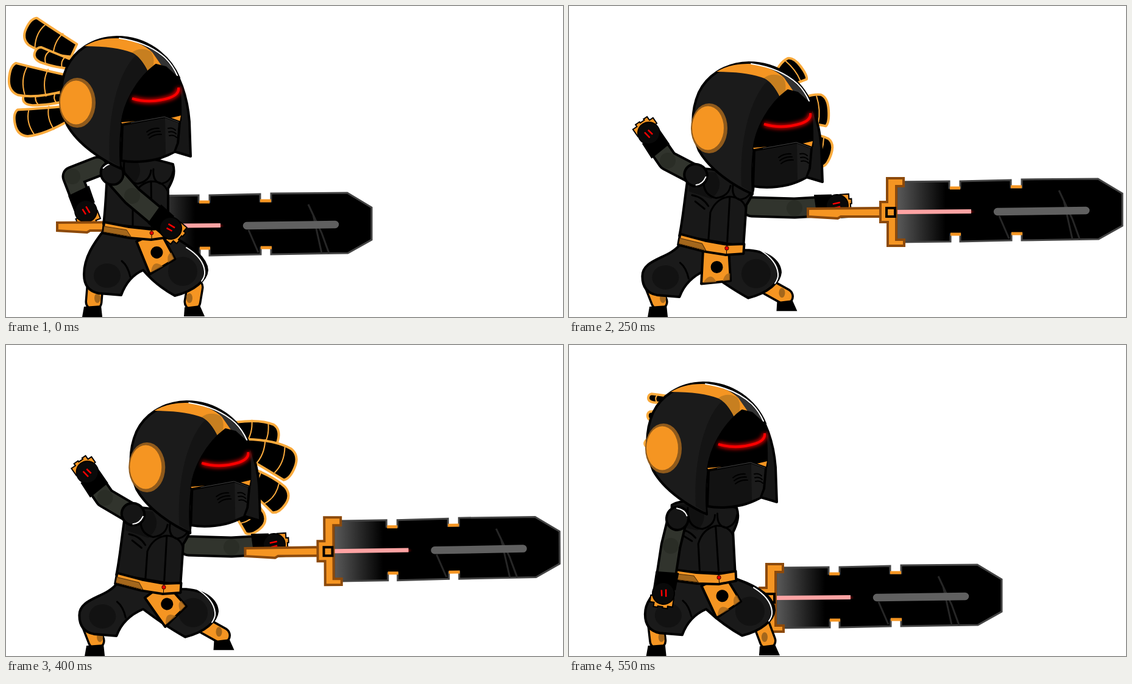
These frames come from a looping animation (914x511 px, 600 ms). An HTML page:

```html
<!DOCTYPE html>
<html lang="en">
<head>
<meta charset="utf-8">
<title>Ninja thrust</title>
<style>
  html, body { margin: 0; width: 100%; height: 100%; overflow: hidden; background: #fff; }
  svg { display: block; width: 100vw; height: 100vh; }
  .ink { stroke: #000; stroke-width: 4; stroke-linejoin: round; }
  .line { fill: none; stroke: #000; stroke-width: 3; stroke-linecap: round; }
  .shine { fill: none; stroke: #fff; stroke-width: 2; stroke-linecap: round; }
  .gold { fill: #f59522; }
  .bronze { fill: #a4671c; }
  .limb { fill: none; stroke-linejoin: round; stroke-linecap: round; }
  .mark { fill: none; stroke: #f00; stroke-width: 2.5; }
</style>
</head>
<body>
<svg viewBox="0 0 914 511" preserveAspectRatio="none">
  <defs>
    <linearGradient id="steel" gradientUnits="userSpaceOnUse" x1="538" y1="0" x2="618" y2="0">
      <stop offset="0" stop-color="#5a5a5a"/><stop offset=".5" stop-color="#2c2c2c"/><stop offset="1"/>
    </linearGradient>
    <filter id="glow" x="-20%" y="-150%" width="140%" height="400%"><feGaussianBlur stdDeviation="3"/></filter>
  </defs>

  <g id="plume"></g>
  <g id="farArm"></g>

  <g id="sword">
    <path fill="url(#steel)" stroke="#444" stroke-width="3" d="M538 289 L624 288 V299 H642 V288 L725 286 V298 H743 V285 L868 284 L908 308 V361 L869 383 L743 385 V374 H726 V385 L642 387 V375 H626 V387 L538 388Z"/>
    <path fill="none" stroke="#262626" stroke-width="3" d="M804 303 L826 350 L838 383 M812 320 L826 383 M706 345 L722 382"/>
    <path stroke="#f59522" stroke-width="5" d="M625 299 h17 M725 297 h18 M626 375 h17 M726 374 h18"/>
    <path d="M703 338 L848 336" stroke="#606060" stroke-width="12.5" stroke-linecap="round"/>
    <g id="beam"></g>
    <g class="gold" stroke="#8c4a0c" stroke-width="4">
      <path d="M392 333 L512 332 V346 H446 L441 349 L392 346Z"/>
      <path d="M522 283 H549 V296 H537 V384 H550 V394 H523 V355 H511 V322 H522Z"/>
      <path stroke="#000" d="M521 332 h14 v14 h-14Z"/>
    </g>
  </g>

  <path id="shins" class="limb" stroke="#000" stroke-width="29"/>
  <path id="calves" class="limb" stroke="#f59522" stroke-width="22"/>
  <g id="footL"><ellipse class="bronze" cx="6" cy="-14" rx="5" ry="8"/><path d="M-19 17 L-16 0 L12 -2 L14 17Z"/></g>
  <g id="footR"><ellipse class="bronze" cx="-5" cy="-14" rx="5" ry="8"/><path d="M-14 16 L-13 1 L12 -2 L20 16Z"/></g>

  <path id="pants" class="ink" fill="#1a1a1a"/>
  <g id="shadeL"><ellipse cx="38" cy="2" rx="22" ry="20" fill="#121212"/><path class="line" d="M62 -22 Q72 -14 76 4"/></g>
  <g id="shadeR"><ellipse cx="-40" cy="2" rx="24" ry="24" fill="#121212"/><path class="shine" d="M-34 -37 Q-6 -20 -4 2 Q-3 10 -9 18"/></g>

  <g id="cloth">
    <path class="ink gold" d="M-21 -4 H21 L25 48 L-23 54Z"/>
    <path class="bronze" d="M-20 52 Q-8 32 2 51Z M12 49 Q16 34 24 36 V47Z" opacity=".75"/>
    <circle cx="2" cy="26" r="10"/>
  </g>

  <g id="torso">
    <path class="ink" fill="#181818" d="M178 262 C200 250 250 262 284 272 C288 286 284 298 276 312 V380 L170 370 C174 340 174 310 178 262Z"/>
    <path fill="#101010" d="M180 262 H222 Q240 285 218 306 L180 296Z"/>
    <path class="line" d="M218 372 V328 Q226 304 248 300 Q270 300 276 318 M248 300 L249 374 M204 268 Q200 300 226 304 Q246 300 248 282 M252 280 Q250 300 264 304 Q280 302 284 284"/>
    <path class="line" stroke-width="5" d="M186 302 Q204 304 214 318 M192 312 L208 323"/>
    <path class="ink gold" d="M171 367 L212 375 L249 379 L277 376 V392 L248 396 L212 393 L169 385Z"/>
    <path class="bronze" stroke="#4d2d08" d="M171 374 L208 380 L215 391 L170 383Z"/>
    <path stroke="#000" d="M249 379 V395"/>
    <circle cx="249" cy="385" r="3" fill="#e00" stroke="#400"/>
  </g>

  <g id="nearArm"></g>

  <g id="head">
    <path class="ink" fill="#161616" d="M262 85 C285 110 298 150 301 190 L303 247 L276 239 L284 130Z"/>
    <path class="ink" fill="#1b1b1b" d="M188 267 C160 255 118 228 100 195 C87 165 87 130 100 100 C112 75 140 52 182 51 C230 51 268 80 284 118 L246 97 C222 112 195 150 190 185 Q184 225 188 267Z"/>
    <path fill="#141414" d="M212 82 C184 110 166 180 170 254 L187 264 Q184 225 190 185 C195 150 222 112 246 97Z"/>
    <path fill="#333" d="M232 66 Q266 86 282 116 L258 103Z"/>
    <path class="gold" d="M129 66 Q152 52 184 53 Q222 58 240 76 L258 102 L246 98 L234 109 Q222 84 208 77 Q180 66 129 66Z"/>
    <path fill="#c77f20" d="M207 76 Q222 66 238 75 Q246 88 240 104 L234 109 Q222 84 207 76Z"/>
    <path class="shine" d="M186 53 Q234 60 262 86 Q274 98 281 114"/>
    <path class="ink" d="M246 97 L262 101 L281 118 Q287 140 286 188 L190 194 C194 160 215 120 246 97Z"/>
    <path class="gold" d="M189 191 L226 188 L194 198Z M270 184 L287 180 L285 190Z"/>
    <g id="visor"></g>
    <path class="ink" fill="#121212" d="M191 195 L260 182 L285 191 L282 225 L276 240 Q262 248 246 252 Q215 259 189 254Z"/>
    <path fill="#1c1c1c" d="M261 184 L283 192 L280 225 L275 239 L262 244Z"/>
    <path d="M205 192 L260 182 L284 191" fill="none" stroke="#444"/>
    <path id="vents" class="line" style="stroke-width:2"/>
    <ellipse cx="117" cy="159" rx="30" ry="41" fill="#8f5a1c"/>
    <ellipse cx="115" cy="158.5" rx="26" ry="36" class="gold"/>
  </g>
</svg>

<script>
const $ = id => document.getElementById(id);
const LOOP = 600, STEP = 50, FIRST = 150;
const times = [0, 150, 250, 350, 450, 500, 550];

const headKeys = [[0, 0], [54, 17], [113, 42], [117, 44], [111.5, 40], [76, 24], [38, 11]];
const swordKeys = [[-308, 23, 0], [-249, 41, 0], [0, 0, 0], [2, -1, -.7], [-1, 1.5, .1], [-76, 68, 0], [-198, 77, 0]];
const lunge = [259, 397, 4];
const beltKeys = [[239, 372, 0], [249, 384, 0], lunge, lunge, lunge, [253, 389, 1], [246, 381, -3]];
const swung = [247, 406, -37];
const clothKeys = [[235, 382, -24], [235, 393, 4], [241, 403, 1], swung, swung, [240, 400, -35], [238, 390, -27]];
const kneeKeys = [[330], [340], [347], [347], [347], [342], [337]];

// shoulder, elbow, hand
const nearKeys = [[174, 275, 207, 312, 270, 365], [180, 288, 150, 330, 105, 381], [208, 278, 162, 254, 131, 209],
  [211, 278, 168, 248, 140, 204], [206, 278, 157, 254, 127, 214], [186, 285, 145, 306, 78, 325], [178, 285, 167, 330, 155, 408]];
const reach = [300, 330, 370, 332, 440, 328];
const farKeys = [[150, 264, 109, 280, 131, 337], [175, 268, 153, 290, 215, 345], reach, reach, reach,
  [272, 322, 303, 367, 362, 388], [230, 295, 230, 325, 235, 365]];

// Feather tips; tucked ones sit behind the head.
const tuck = [190, 140];
const fan = (left, ...rest) => [left, left, ...rest];
const feathers = [
  { w: 23, tips: fan([33, 37], [267, 57], [335, 107], [329, 122], [279, 94], [92, 76]) },
  { w: 12, tips: fan([47, 77], tuck, tuck, [214, 57], tuck, tuck) },
  { w: 11, tips: fan([28, 153], tuck, tuck, tuck, tuck, tuck) },
  { w: 22, tips: fan(tuck, tuck, [318, 257], [286, 264], tuck, tuck) },
  { w: 26, tips: fan([5, 119], [313, 129], [364, 146], [355, 172], tuck, [91, 107]) },
  { w: 23, tips: fan([15, 195], [317, 202], [358, 212], [330, 228], tuck, [87, 154]) }
];
const foldKeys = [[1, 0], [1, 0], [1, 0], [1, 20], [1, 35], [.35, 10], [.3, 20]];

function pose(keys, t) {
  let i = 0;
  while (i < times.length - 1 && times[i + 1] <= t) i++;
  const next = keys[i + 1];
  if (!next) return keys[i];
  const k = (t - times[i]) / (times[i + 1] - times[i]);
  return keys[i].map((v, j) => v + (next[j] - v) * k);
}

const set = (id, d) => $(id).setAttribute("d", d);
const move = (id, x, y, r = 0, cx = 0, cy = 0) =>
  $(id).setAttribute("transform", `translate(${x} ${y}) rotate(${r} ${cx} ${cy})`);
const angle = (x0, y0, x1, y1) => Math.atan2(y1 - y0, x1 - x0) * 180 / Math.PI;

function neon(id, d, wide, thin, core) {
  $(id).innerHTML = `<g fill="none" stroke="#f00"><path d="${d}" stroke-width="${wide}" filter="url(#glow)" opacity=".85"/>
    <path d="${d}" stroke-width="${thin}" stroke="${core}"/></g>`;
}
neon("beam", "M538 338.5 L660 337.5", 12, 7, "#ffa3a3");
neon("visor", "M207 152 Q236 161 268 151 Q285 145 283 134", 8, 4, "#f00");
set("vents", [0, 1, 2].map(i =>
  `M${231 + i * 2} ${207 + i * 5} q9 -7 20 -6 M${266 + i} ${201 + i * 6} q7 -2 12 3`).join(" "));

for (const id of ["farArm", "nearArm"]) {
  $(id).innerHTML = `
    <path id="${id}Out" class="limb" stroke="#000" stroke-width="35"/>
    <path id="${id}In" class="limb" stroke="#31342d" stroke-width="27"/>
    <circle id="${id}Joint" r="13" fill="#2a2d26"/>
    <g id="${id}Hand">
      <path class="gold" stroke="#000" stroke-width="2" d="M6 -18 h14 v8 h4 v8 h-2 v8 h2 v7 h-7 v7 h-11Z"/>
      <path d="M-37 -20 L-8 -19 L-6 18 L-34 18Z"/>
      <circle r="18" fill="#090909" stroke="#000" stroke-width="2"/>
      <path class="mark" d="M-7 -3 l12 -2 m-10 9 l10 -2"/>
    </g>`;
}
$("nearArmJoint").insertAdjacentHTML("afterend", `<g id="pad">
  <ellipse class="ink" rx="19" ry="18" fill="#151515"/><path class="shine" d="M-8 -14 Q-17 -8 -16 5"/></g>`);
$("plume").innerHTML = feathers.map((_, i) => `<g id="feather${i}" stroke="#faaa3c">
  <path stroke-width="4" stroke-linejoin="round"/><path fill="none" stroke-width="2"/></g>`).join("");

function drawArm(id, [sx, sy, ex, ey, hx, hy]) {
  const a = angle(ex, ey, hx, hy), rad = a * Math.PI / 180;
  const d = `M${sx} ${sy} L${ex} ${ey} L${hx - 26 * Math.cos(rad)} ${hy - 26 * Math.sin(rad)}`;
  set(id + "Out", d);
  set(id + "In", d);
  move(id + "Joint", ex, ey);
  move(id + "Hand", hx, hy, a);
}

function drawFeather(i, [x, y], [size, droop]) {
  const w = feathers[i].w * size;
  const rx = tuck[0] + (x - tuck[0]) * .5, ry = tuck[1] + (y - tuck[1]) * .65 - droop;
  const n = Math.hypot(x - rx, y - ry), g = $("feather" + i);
  move(g.id, rx, ry, angle(rx, ry, x, y));
  g.children[0].setAttribute("d", `M0 ${-w / 2} Q${n / 2} ${-w * 1.15} ${n * .82} ${-w}
    Q${n} ${-w * .8} ${n} 0 Q${n} ${w * .8} ${n * .9} ${w} Q${n / 2} ${w * .75} 0 ${w / 2}Z`);
  g.children[1].setAttribute("d", [.32, .7].map(k =>
    `M${n * k} ${-w * .95} Q${n * (k + .1)} 0 ${n * k} ${w * .8}`).join(" "));
}

// The whole stance follows from how far the right knee reaches.
function drawLegs(gx, gy, rx) {
  const s = rx - 330, lx = 128 - s * .45, ly = 441 + s * .17, ry = 434 + s * .22;
  const la = 144 + s * .24, ra = 306 + s * 2.85, rb = 494 - Math.max(0, s - 10) * 1.25;
  const d = `M${lx + 18} 461 L${la} 486 M${rx - 20} 462 L${ra} ${rb - 8}`;
  set("shins", d);
  set("calves", d);
  move("footL", la, 494);
  move("footR", ra, rb);
  set("pants", `M${gx - 78} ${gy - 4}
    C${gx - 95} ${gy + 18} ${lx} ${ly - 28} ${lx} ${ly}
    C${lx} ${ly + 18} ${lx + 8} ${ly + 28} ${lx + 24} ${ly + 31}
    L${lx + 61} ${ly + 34} Q${lx + 72} ${ly + 4} 225 434
    Q${rx - 84} ${ry + 25} ${rx - 53} ${ry + 42}
    C${rx - 20} ${ry + 34} ${rx - 1} ${ry + 16} ${rx} ${ry}
    C${rx - 1} ${ry - 18} ${rx - 20} ${ry - 36} ${gx + 30} ${gy + 4}Z`);
  move("shadeL", lx, ly);
  move("shadeR", rx, ry);
}

function draw(ms) {
  const t = ms < FIRST ? 0 : Math.floor(ms / STEP) * STEP;
  const at = keys => t ? pose(keys, t) : keys[0];
  const [gx, gy, lean] = at(beltKeys), head = at(headKeys), near = at(nearKeys);
  move("head", ...head);
  move("plume", ...head);
  feathers.forEach((f, i) => drawFeather(i, at(f.tips), at(foldKeys)));
  move("sword", ...at(swordKeys), 528, 339);
  move("torso", gx - 249, gy - 384, lean, 249, 384);
  move("cloth", ...at(clothKeys));
  drawLegs(gx, gy, at(kneeKeys)[0]);
  drawArm("farArm", at(farKeys));
  drawArm("nearArm", near);
  move("pad", near[0], near[1], angle(...near.slice(0, 4)));
}

const start = performance.now();
function tick() {
  draw((performance.now() - start) % LOOP);
  requestAnimationFrame(tick);
}
tick();
</script>
</body>
</html>
```
